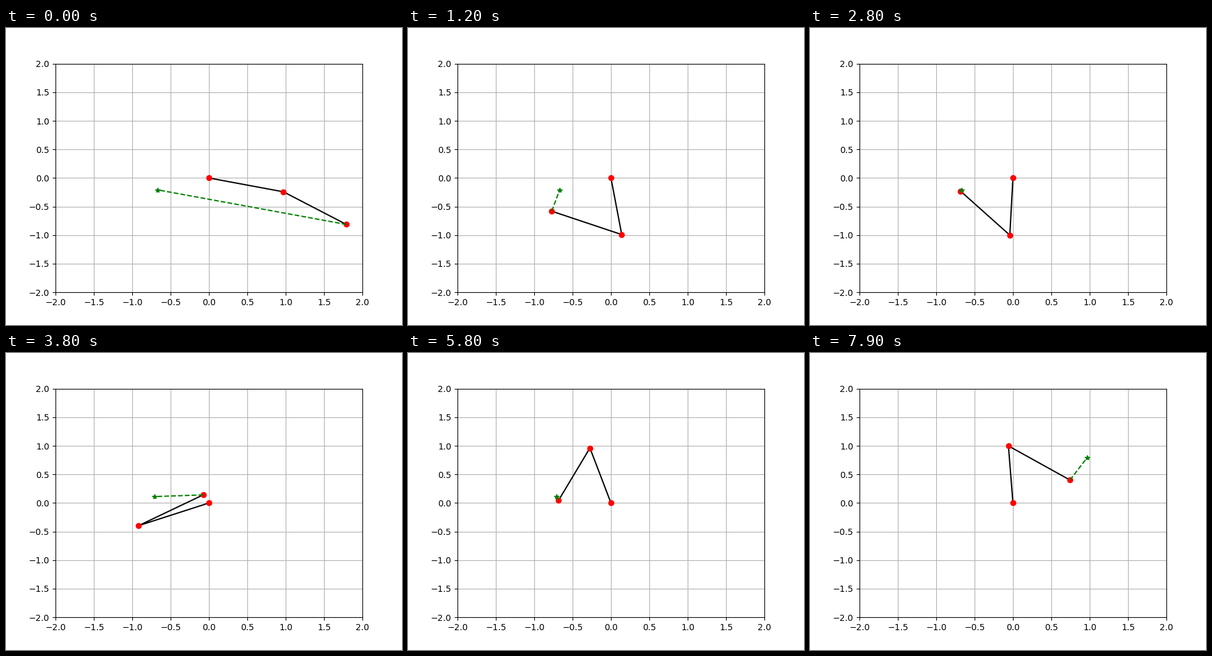
Write a matplotlib script that moves like this. It is 640 by 480 pixels and loops after 8000 ms.

```python
import numpy as np
import matplotlib.pyplot as plt
from matplotlib.animation import FuncAnimation

FRAMES, INTERVAL = 80, 100
GAIN = 0.15  # share of the angle error removed per step

# start step -> target point
GOALS = {0: (-0.668, -0.208), 36: (-0.707, 0.112), 71: (0.968, 0.796)}


def wrap(angle):
    return (angle + np.pi) % (2 * np.pi) - np.pi


def solve(x, y):
    """Joint angles that put the tip of two unit links on (x, y)."""
    bend = 2 * np.arccos(np.hypot(x, y) / 2)
    heading = np.arctan2(y, x)
    if heading < bend / 2:
        bend = -bend
    return np.array([heading - bend / 2, bend])


def simulate():
    joints = np.zeros(2)
    poses = []
    for step in range(FRAMES):
        if step in GOALS:
            goal = GOALS[step]
            target = solve(*goal)
        joints = joints + GAIN * wrap(target - joints)
        poses.append((joints, goal))
    return poses


poses = simulate()

fig, ax = plt.subplots(figsize=(6.4, 4.8), dpi=100)
ax.set_xlim(-2, 2)
ax.set_ylim(-2, 2)
ax.grid(True)

links, = ax.plot([], [], "k-")
dots, = ax.plot([], [], "ro")
gap, = ax.plot([], [], "g--")
star, = ax.plot([], [], "g*")


def update(i):
    joints, (gx, gy) = poses[i]
    angles = np.cumsum(joints)
    xs = np.r_[0, np.cumsum(np.cos(angles))]
    ys = np.r_[0, np.cumsum(np.sin(angles))]
    links.set_data(xs, ys)
    dots.set_data(xs, ys)
    gap.set_data([xs[-1], gx], [ys[-1], gy])
    star.set_data([gx], [gy])
    return links, dots, gap, star


anim = FuncAnimation(fig, update, frames=FRAMES, interval=INTERVAL,
                     repeat=True, repeat_delay=0)
plt.show()
```
